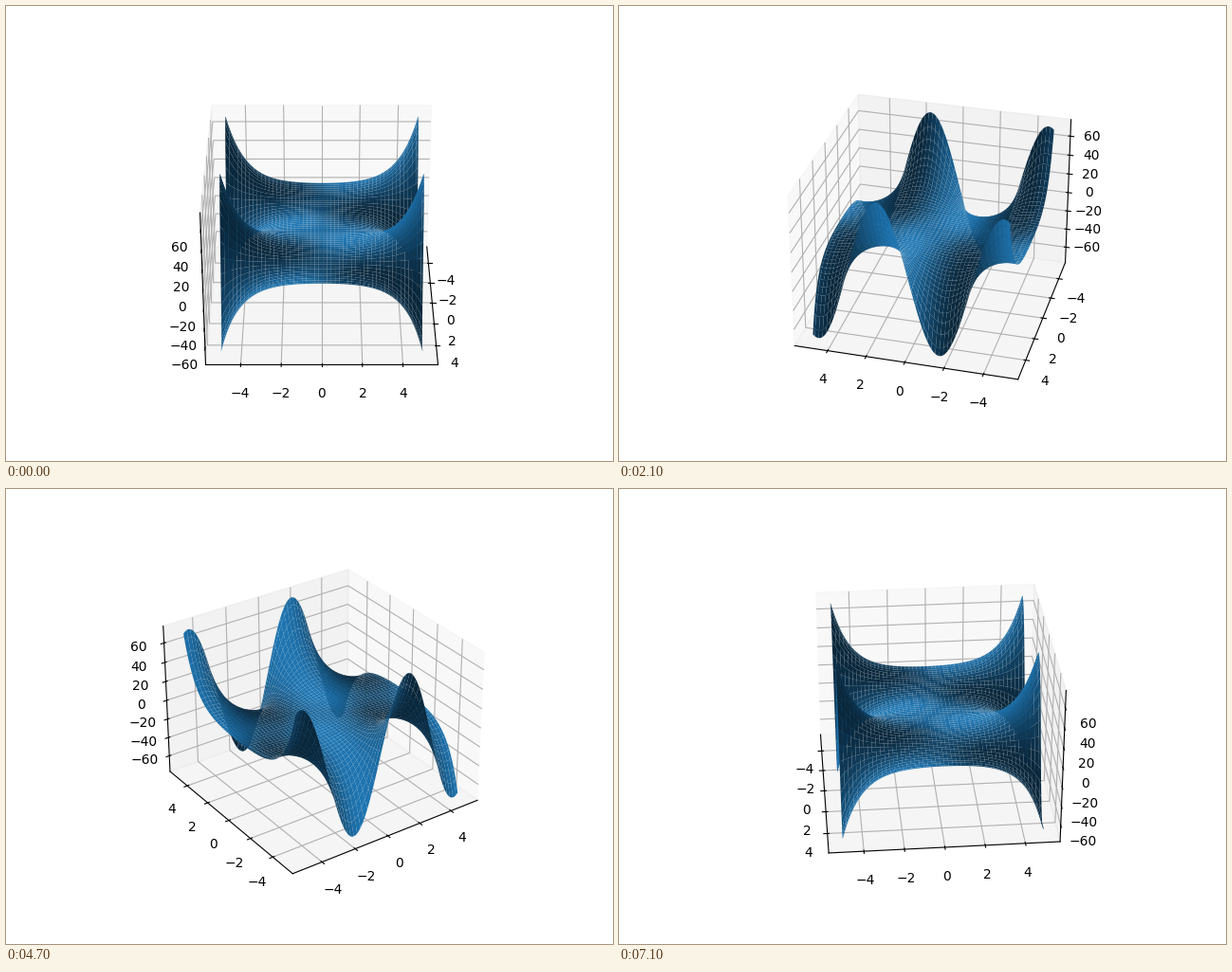
Write a matplotlib script that moves like this. It is 640 px wide and 480 px high and loops after 7.2 s.

```python
import numpy as np
import matplotlib.pyplot as plt
from matplotlib.animation import FuncAnimation

FRAMES = 72
INTERVAL = 100
MARGIN = 1 / 48

fig = plt.figure(figsize=(6.4, 4.8), dpi=100)
ax = fig.add_subplot(projection="3d")

# Real part of the complex sine
side = np.linspace(-5, 5, 100)
x, y = np.meshgrid(side, side)
z = np.sin(x) * np.cosh(y)
ax.plot_surface(x, y, z)

ax.set_xlim(-5.5, 5.5, view_margin=MARGIN)
ax.set_ylim(-5.5, 5.5, view_margin=MARGIN)
ax.set_zlim(z.min(), z.max(), view_margin=MARGIN)


def turn(frame):
    ax.view_init(elev=30, azim=frame * 360 / FRAMES)
    return []


anim = FuncAnimation(fig, turn, frames=FRAMES, init_func=lambda: turn(0),
                     interval=INTERVAL, repeat=True, repeat_delay=0)
plt.show()
```
